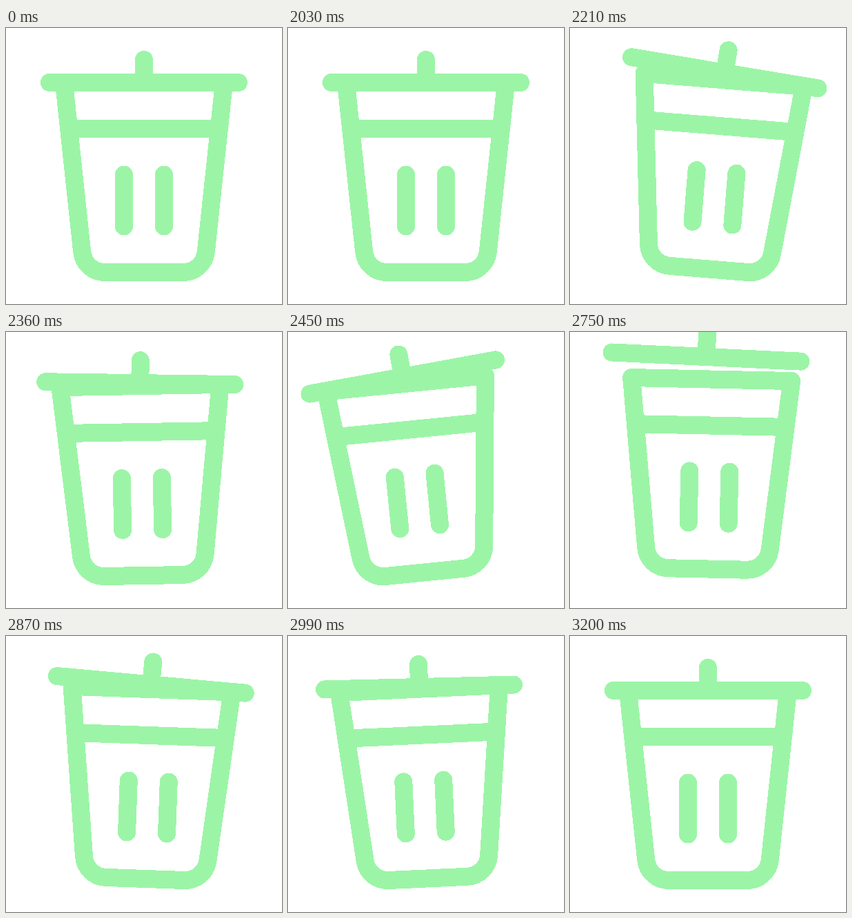
These frames come from a looping animation (400x400 px, 3260 ms). An HTML page:

```html
<!DOCTYPE html>
<html lang="en">
<head>
<meta charset="utf-8">
<title>Trash bin</title>
<style>
  html, body { margin: 0; width: 100%; height: 100%; overflow: hidden; background: #fff; }
  svg { display: block; width: 100vw; height: 100vh; shape-rendering: crispEdges; }
  #bin { fill: none; stroke: #9cf5a7; stroke-width: 26; stroke-linecap: round; stroke-linejoin: round; }
</style>
</head>
<body>
<svg viewBox="0 0 400 400">
  <g id="bin">
    <path d="M84 79H316L289.8 324.5A33 33 0 0 1 257 354H143A33 33 0 0 1 110.2 324.5Z"/>
    <path d="M92 146H308M171 212.5V287.5M229 212.5V287.5"/>
    <path id="lid" d="M63 79H337M200 46V79"/>
  </g>
</svg>
<script>
const LOOP = 3260, START = 2030, END = 3200, STEP = 30;
const FOOT = 57;   // half the width of the flat base
const HINGE = 125; // from the lid's middle to the edge it opens on

// Turning points [time, value], joined by sine easing
const swing = [[START, 0], [2224, 4.7], [2490, -6.3], [2836, 2.5], [3025, -3.1], [END, 0]];
const flap = [[START, 0], [2257, 5.4], [2570, -9.4], [2800, 2.9], [2920, 3.2], [3085, -2], [END, 0]];
const drift = [[2224, 0], [2490, -1], [2750, -1], [2990, 3.4], [END, 0]];
const slide = [[2340, 0], [2650, -11.4], [2940, 0]];

function track(points, t) {
  const i = points.findIndex(p => p[0] > t);
  if (i < 1) return 0;
  const [t0, a] = points[i - 1], [t1, b] = points[i];
  return a + (b - a) * (1 - Math.cos(Math.PI * (t - t0) / (t1 - t0))) / 2;
}

// Height of a ballistic jump
function hop(t, from, to, height) {
  const u = (t - from) / (to - from);
  return Math.max(0, 4 * height * u * (1 - u));
}

// Rise of a part that tips over one end of the given arm
const tip = (arm, angle) => arm * Math.sin(Math.abs(angle) * Math.PI / 180);

function place(id, x, y, angle, pivotY) {
  document.getElementById(id)
    .setAttribute('transform', `translate(${x} ${y}) rotate(${angle} 200 ${pivotY})`);
}

const begin = performance.now();

function draw() {
  let t = (performance.now() - begin) % LOOP;
  if (t >= START) t = START + Math.floor((t - START) / STEP) * STEP;

  const lean = track(swing, t), open = track(flap, t);
  place('bin', track(drift, t), -tip(FOOT, lean) - hop(t, 2520, 2850, 11), lean, 367);
  place('lid', track(slide, t), -tip(HINGE, open) - hop(t, 2562, 2870, 30.5), open, 79);
  requestAnimationFrame(draw);
}
draw();
</script>
</body>
</html>
```
